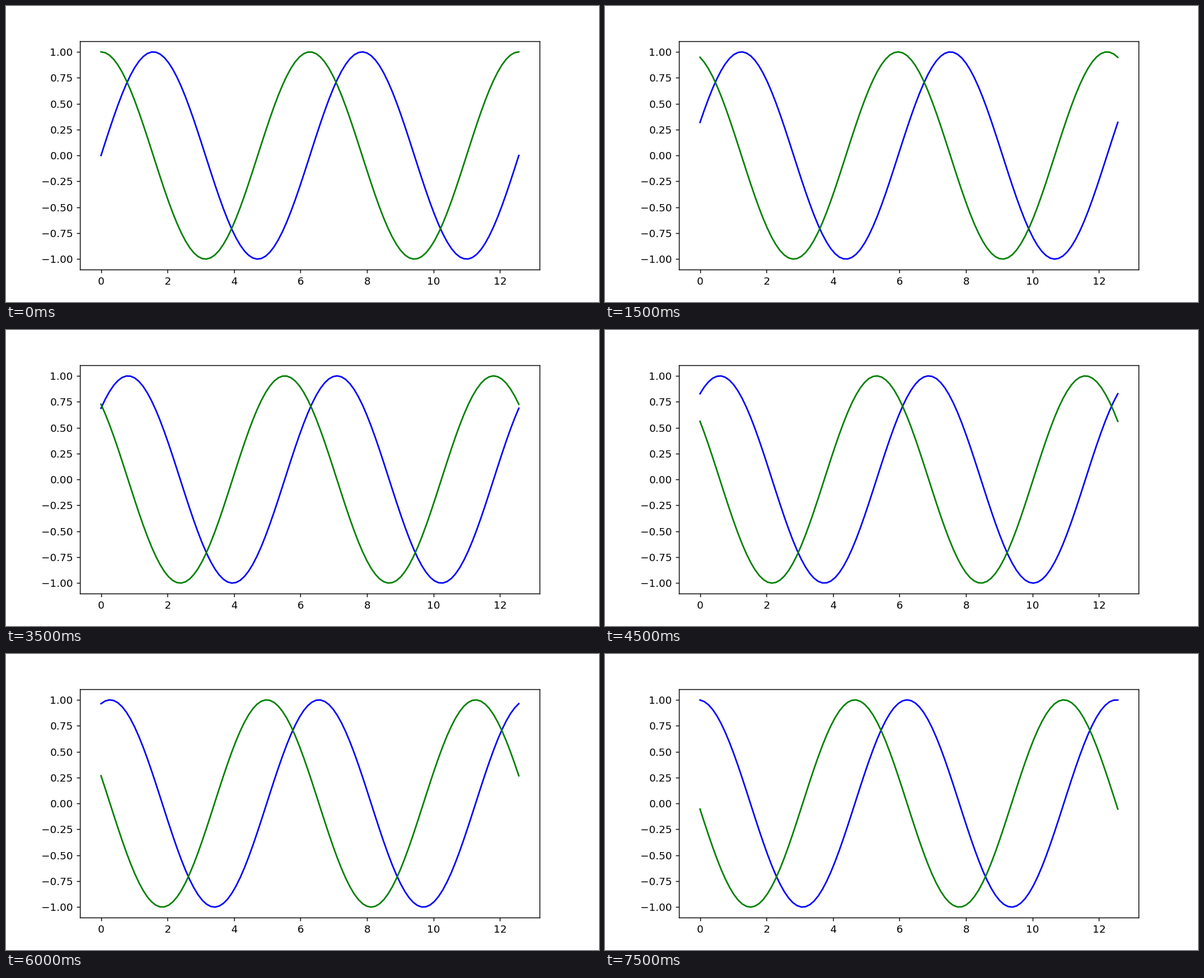
A matplotlib script for the animation above (8 s loop, 1058 by 529 pixels).

```python
import numpy as np
import matplotlib.pyplot as plt
from matplotlib.animation import FuncAnimation

FRAMES = 16
INTERVAL = 500
STEP = 2 * np.pi / 58  # phase advance per frame

fig, ax = plt.subplots(figsize=(8, 4), dpi=132.25)
x = np.linspace(0, 4 * np.pi, 100)
sin_line, = ax.plot(x, np.sin(x), color="blue")
cos_line, = ax.plot(x, np.cos(x), color="green")


def update(i):
    phase = i * STEP
    sin_line.set_ydata(np.sin(x + phase))
    cos_line.set_ydata(np.cos(x + phase))
    return sin_line, cos_line


anim = FuncAnimation(fig, update, frames=FRAMES, interval=INTERVAL,
                     repeat=True, repeat_delay=0)
plt.show()
```
